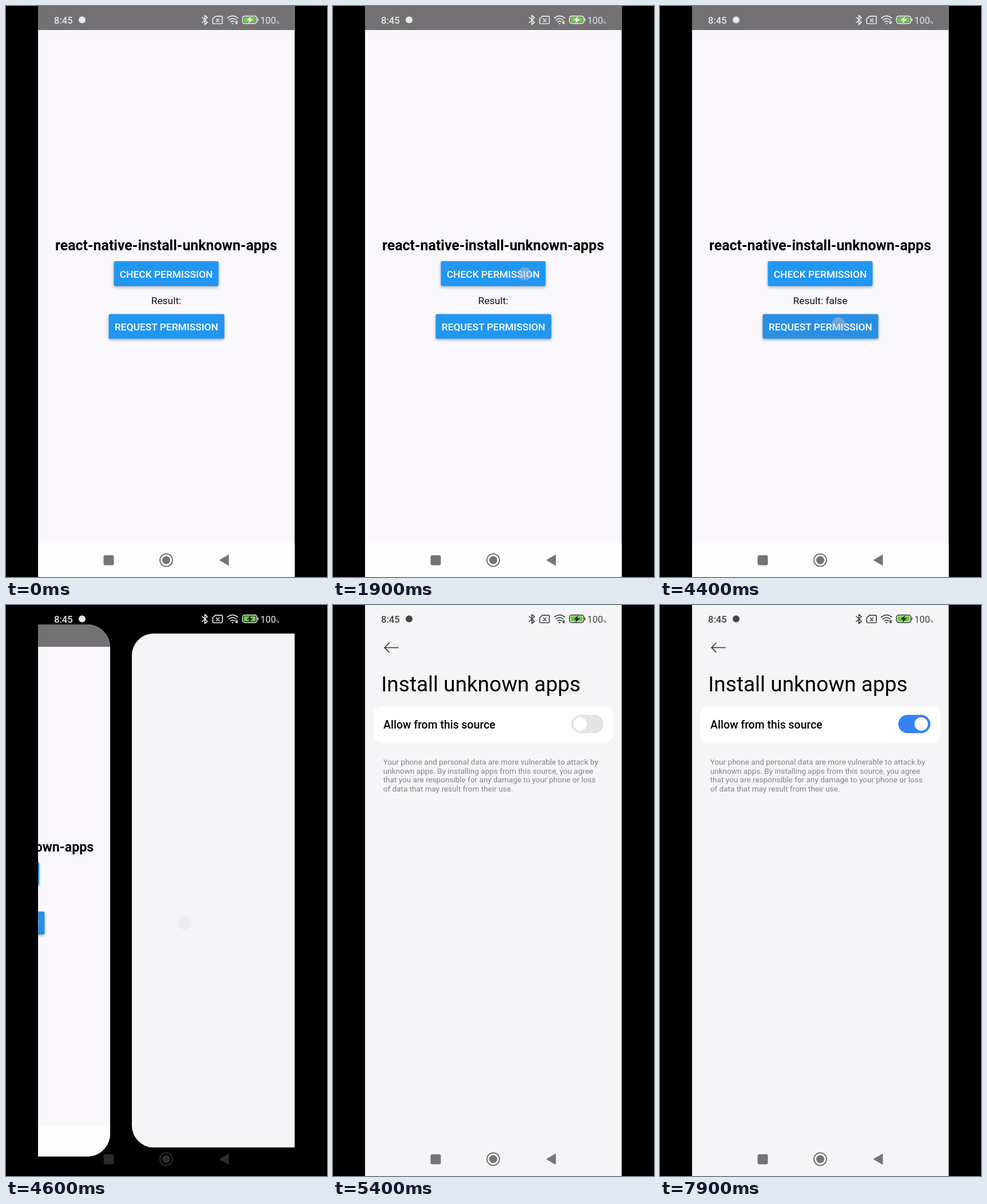
Write an HTML page that moves like this. It is 561x998 px and loops after 8 s.

```html
<!DOCTYPE html>
<html lang="en">
<head>
<meta charset="utf-8">
<title>Install unknown apps</title>
<style>
  html, body { margin: 0; width: 100%; height: 100%; overflow: hidden; background: #000; }
  svg { display: block; width: 100vw; height: 100vh; font-family: Roboto, sans-serif; }
  .middle { text-anchor: middle; }
  .button rect { fill: #2196f3; filter: drop-shadow(0 2px 2.5px rgba(0, 0, 0, .32)); }
  .button text { fill: #fff; font-size: 17.42px; font-weight: 500; }
  .line { fill: none; stroke: currentColor; stroke-width: 1.7; stroke-linecap: round; stroke-linejoin: round; }
</style>
</head>
<body>
<svg viewBox="0 0 561 998">
  <defs>
    <clipPath id="screenClip"><rect x="56" width="448.5" height="998"/></clipPath>
    <clipPath id="pageClip"><rect id="pageShape" x="56" width="448.5" height="998"/></clipPath>
  </defs>
  <rect width="561" height="998"/>
  <g clip-path="url(#screenClip)">
    <g id="appPage"><g clip-path="url(#pageClip)">
      <rect x="56" width="449" height="998" fill="#faf8fc"/>
      <rect x="56" width="449" height="42" fill="#737173"/>
      <rect x="56" y="939" width="449" height="59" fill="#fefefe"/>
      <text class="middle" x="279.8" y="426.5" font-size="24.9" font-weight="700">react-native-install-unknown-apps</text>
      <g class="button">
        <rect x="188.5" y="446" width="183" height="43.5" rx="2.5"/>
        <text class="middle" x="280" y="474.7">CHECK PERMISSION</text>
      </g>
      <text id="result" class="middle" x="280" y="521" font-size="17.42" fill="#111"></text>
      <g class="button">
        <rect id="requestButton" x="179.5" y="538.5" width="202" height="43" rx="2.5"/>
        <text class="middle" x="280.4" y="567">REQUEST PERMISSION</text>
      </g>
    </g></g>

    <g id="settingsPage"><g clip-path="url(#pageClip)">
      <rect x="56" width="449" height="998" fill="#f5f4f7"/>
      <g id="settings">
        <path d="M114 74.5H90M98 66.5L90 74.5L98 82.5" class="line" color="#333"/>
        <text x="84.3" y="151" font-size="37">Install unknown apps</text>
        <rect x="70" y="177" width="420.5" height="63.5" rx="16" fill="#fff"/>
        <text x="88" y="216" font-size="19.45" font-weight="500">Allow from this source</text>
        <rect id="toggle" x="416.5" y="192" width="56" height="32" rx="16"/>
        <circle id="knob" cy="208" r="11.7" fill="#fff"/>
        <g fill="#858487" font-size="13.55">
          <text x="87.7" y="279">Your phone and personal data are more vulnerable to attack by</text>
          <text x="87.7" y="294.6">unknown apps. By installing apps from this source, you agree</text>
          <text x="87.7" y="310.2">that you are responsible for any damage to your phone or loss</text>
          <text x="87.7" y="325.8">of data that may result from their use.</text>
        </g>
      </g>
    </g></g>

    <g id="statusBar" fill="currentColor">
      <text x="84" y="30.7" font-size="16.6" font-weight="500">8:45</text>
      <circle cx="133" cy="24.3" r="6"/>
      <path class="line" d="M343 20L352 28.5L347.5 32.5V16.5L352 20.5L343 29"/>
      <path class="line" d="M366 17.8H376.5Q378 17.8 378 19.3V29.5Q378 31 376.5 31H363Q361.3 31 361.3 29.5V22.3ZM367.5 22.5L372.5 27.5M372.5 22.5L367.5 27.5"/>
      <path class="line" stroke-width="2" d="M387 21Q396 13.8 405 21M389.8 24.4Q396 19.4 402.2 24.4M392.6 27.6Q396 25 399.4 27.6"/>
      <path d="M394 30H398L396 32.5Z"/>
      <path class="line" stroke-width="1" d="M402 27V31M404 27V31"/>
      <rect class="line" x="413.3" y="17.6" width="25.2" height="13" rx="4"/>
      <rect x="415.3" y="19.6" width="21.2" height="9" rx="2" fill="#68cc45"/>
      <rect x="439.6" y="21.8" width="1.6" height="4.6" rx=".8"/>
      <path id="bolt" d="M428.5 17.8L420.5 25.2H425.2L423.5 30.8L431.8 23H426.8Z"/>
      <text x="444.5" y="30.5" font-size="16.2">100<tspan font-size="8">%</tspan></text>
    </g>

    <g id="navBar" fill="currentColor">
      <rect x="170.5" y="960" width="18" height="17.5" rx="3"/>
      <circle cx="280" cy="968.5" r="11" fill="none" stroke="currentColor" stroke-width="2"/>
      <circle cx="280" cy="968.5" r="7"/>
      <path d="M372.5 968.5L389.5 958.5V978.5Z"/>
    </g>
    <circle id="touch" r="11.5" fill="#b9bec4" stroke="#999" stroke-opacity=".4"/>
  </g>
</svg>
<script>
const LOOP = 8000;
const SLIDE_START = 4420, SLIDE_END = 5000;
const byId = id => document.getElementById(id);
const set = (id, attributes) => {
  for (const name in attributes) byId(id).setAttribute(name, attributes[name]);
};

// Value at time t along [time, value] points, held at both ends.
function track(t, points) {
  const next = points.findIndex(point => point[0] > t);
  if (next === 0) return points[0][1];
  if (next < 0) return points[points.length - 1][1];
  const [t0, v0] = points[next - 1], [t1, v1] = points[next];
  return v0 + (v1 - v0) * (t - t0) / (t1 - t0);
}

const appShift = [[SLIDE_START, 0], [4500, -100], [4600, -306], [4700, -425], [4800, -480]];
const appScale = [[SLIDE_START, 1], [4500, .945], [4600, .932], [4700, .92]];
const settingsShift = [[SLIDE_START, 480], [4500, 354], [4600, 142.6], [4700, 40], [4800, 7.8], [4900, 1], [SLIDE_END, 0]];
const settingsScale = [[SLIDE_START, .95], [4500, .918], [4600, .9], [4700, .95], [4800, .986], [4900, .998], [SLIDE_END, 1]];

function placePage(id, shift, scale) {
  set(id, { transform: `translate(${280.25 + shift} 499) scale(${scale}) translate(-280.25 -499)` });
}

function touchAt(t) {
  if (t < 3000) return [335, 468, track(t, [[1790, 0], [1870, .5], [1940, .5], [2060, 0]])];
  if (t < 6000) return [312, 555.5, track(t, [[4260, 0], [4340, .5], [4480, .5], [4600, .12], [4660, 0]])];
  return [444, 208, track(t, [[7290, 0], [7340, .4], [7420, .4], [7520, 0]])];
}

function draw(t) {
  const sliding = t > SLIDE_START && t < SLIDE_END;
  const darkIcons = t >= 4680;
  set("pageShape", { rx: sliding ? 43 : 0 });

  placePage("appPage", track(t, appShift), track(t, appScale));
  set("appPage", { visibility: t < 4800 ? "visible" : "hidden" });
  byId("result").textContent = t < 2000 ? "Result:" : "Result: false";
  byId("requestButton").style.fill = t > 4340 ? "#2a8fe4" : "#2196f3";

  placePage("settingsPage", track(t, settingsShift), track(t, settingsScale));
  set("settingsPage", { visibility: t > SLIDE_START ? "visible" : "hidden" });
  set("settings", { opacity: t < 4880 ? 0 : 1 });

  const linear = track(t, [[7420, 0], [7800, 1]]);
  const on = linear * linear * (3 - 2 * linear);
  const mix = (from, to) => Math.round(from + (to - from) * on);
  set("toggle", { fill: `rgb(${mix(228, 54)},${mix(227, 130)},${mix(230, 247)})` });
  set("knob", { cx: 432 + 24.5 * on });

  set("statusBar", { color: darkIcons ? "#454447" : "#e9e8e9" });
  set("bolt", { fill: t > SLIDE_START ? "#252525" : "#f4f4f4" });
  set("navBar", { color: sliding && !darkIcons ? "#2b2b2b" : "#757477" });

  const [cx, cy, opacity] = touchAt(t);
  set("touch", { cx, cy, opacity });
}

const start = performance.now();
function tick() {
  draw((performance.now() - start) % LOOP);
  requestAnimationFrame(tick);
}
tick();
</script>
</body>
</html>
```
